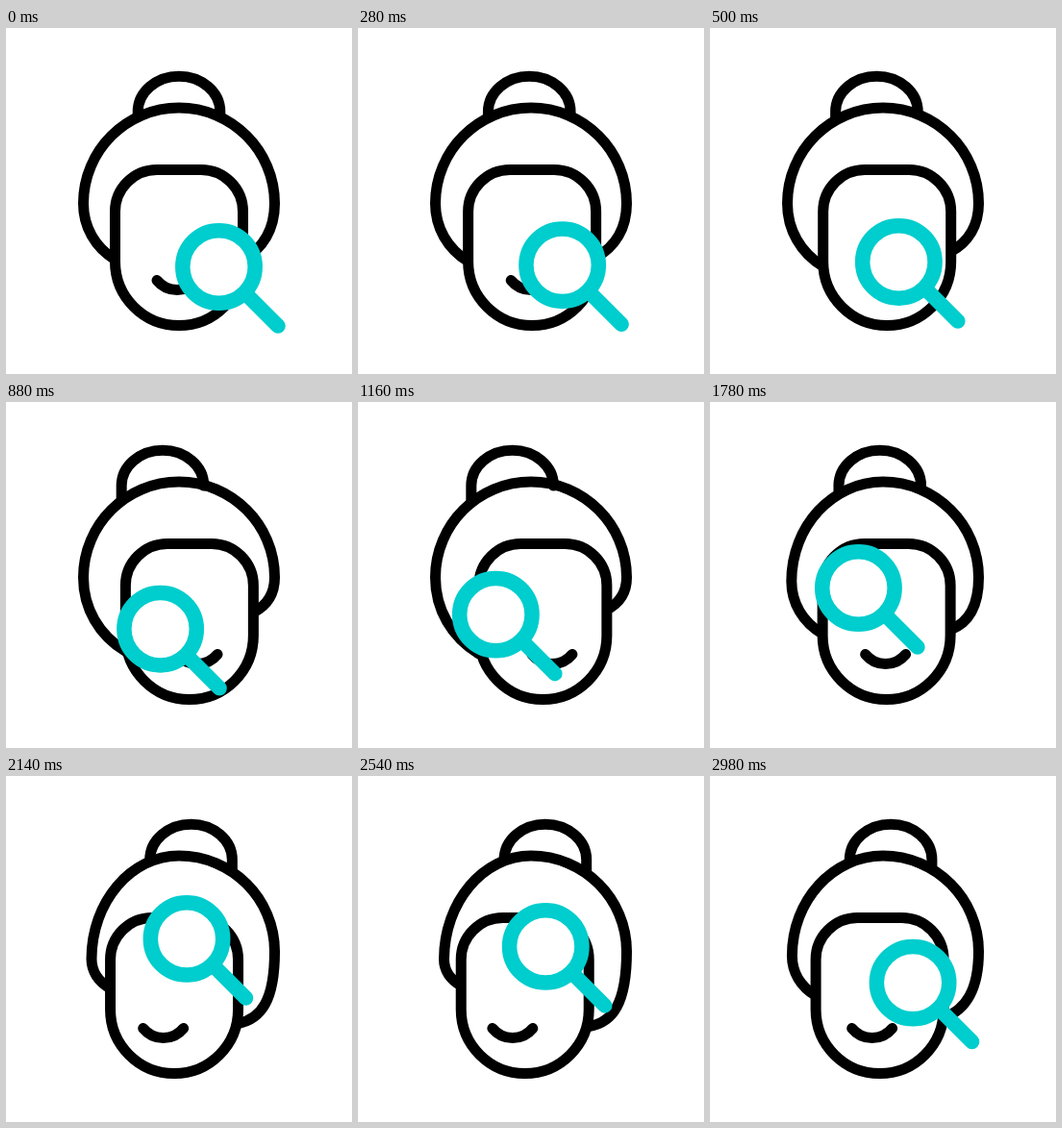
An HTML page that plays this animation: 360 px wide and 360 px high, repeating every 3 s.

```html
<!DOCTYPE html>
<html lang="en">
<head>
<meta charset="utf-8">
<title>Face search</title>
<style>
  html, body { margin: 0; width: 100%; height: 100%; overflow: hidden; background: #fff; }
  svg { display: block; width: 100%; height: 100%; }
  .line { fill: none; stroke: #000; stroke-width: 11; stroke-linecap: round; stroke-linejoin: round; }
  .glass { fill: #fff; stroke: #00cdcd; stroke-width: 15.5; stroke-linecap: round; }
</style>
</head>
<body>
<svg viewBox="0 0 360 360">
  <g class="line">
    <path id="bun"/>
    <path id="hair"/>
    <path id="face" fill="#fff" d="M113.5 191A43.5 43.5 0 0 1 157 147.5H203A43.5 43.5 0 0 1 246.5 191V243A66.5 66.5 0 0 1 113.5 243Z"/>
    <path id="smile" d="M-21 262.5A27 27 0 0 0 21 262.5"/>
  </g>
  <g id="glass" class="glass">
    <path d="M28 28L61.5 61.5"/>
    <circle r="37.7"/>
  </g>
</svg>
<script>
const LOOP = 3000;
const $ = id => document.getElementById(id);
const mix = (a, b, k) => a + (b - a) * k;
const smooth = u => u * u * (3 - 2 * u);

// cubic-bezier(.5, 0, .5, 1)
function ease(p) {
  let lo = 0, hi = 1;
  for (let i = 0; i < 24; i++) {
    const u = (lo + hi) / 2;
    if (1.5 * u - 1.5 * u * u + u * u * u < p) lo = u; else hi = u;
  }
  return smooth(lo);
}

// Head poses: facing front, then each side.
// sideX, sideY: leftmost hair point; left, right: heights of the hair ends; full: roundness at lower right
const front = { bun: 180, face: 0, smile: 178, sideX: 80.5, sideY: 182.5, left: 241, right: 241, full: 0 };
const poseA = { bun: 160.6, face: 12.4, smile: 202, sideX: 80.5, sideY: 182.5, left: 262, right: 216, full: 0 };
const poseB = { bun: 195.2, face: -6.4, smile: 160.5, sideX: 89.7, sideY: 191, left: 217.5, right: 261, full: 1 };
const poses = [front, poseA, poseB, front];
const TURN = 1200;

function headAt(t) {
  const i = Math.floor(t / TURN);
  const k = ease(t / TURN - i);
  const pose = {};
  for (const key in front) pose[key] = mix(poses[i][key], poses[i + 1][key], k);
  return pose;
}

const hairTop = x => 182.5 - Math.sqrt(99.5 ** 2 - (x - 180) ** 2);

function drawHead(p) {
  const bl = p.bun - 42.8, br = p.bun + 42.8;
  $("bun").setAttribute("d",
    `M${bl} ${hairTop(bl) - 2}V87A42.8 36.8 0 0 1 ${br} 87V${Math.max(87, hairTop(br) - 2)}`);

  const y = 182.5, top = 83, mid = 180, far = 279.5, k = 0.552;
  const { sideX, sideY, left, right, full } = p;
  const lx = 113.5 + p.face, rx = 246.5 + p.face;
  $("hair").setAttribute("d",
    `M${lx} ${left}` +
    `C${mix(sideX, lx, .37)} ${mix(sideY, left, .78)} ${sideX} ${mix(sideY, left, .42)} ${sideX} ${sideY}` +
    `C${sideX} ${mix(sideY, top, k)} ${mix(mid, sideX, k)} ${top} ${mid} ${top}` +
    `C${mix(mid, far, k)} ${top} ${far} ${mix(y, top, k)} ${far} ${y}` +
    `C${far} ${mix(y, right, .46 + .24 * full)} ${mix(far, rx, .37)} ${mix(y, right, .8 + .15 * full)} ${rx} ${right}`);

  $("face").setAttribute("transform", `translate(${p.face})`);
  $("smile").setAttribute("transform", `translate(${p.smile})`);
}

const track = (start, end, d) => {
  const path = document.createElementNS("http://www.w3.org/2000/svg", "path");
  path.setAttribute("d", d);
  return { start, end, path, length: path.getTotalLength() };
};
const tracks = [
  track(0, 1500, "M221.5 248.5L163 236.8C148 233.8 141 222 141 208.5"),
  track(1500, 2250, "M141 208.5C141 199 165 188.5 191 167"),
  track(2250, 3540, "M191 167C196 181 213 213 221.5 248.5")
];

function drawGlass(t) {
  const s = tracks.find(s => t < s.end);
  const k = smooth((t - s.start) / (s.end - s.start));
  const { x, y } = s.path.getPointAtLength(k * s.length);
  $("glass").setAttribute("transform", `translate(${x} ${y})`);
}

let origin;
function frame(now) {
  origin ??= now;
  const t = Math.max(0, now - origin) % LOOP;
  drawHead(headAt(t));
  drawGlass(t);
  requestAnimationFrame(frame);
}
drawHead(front);
drawGlass(0);
requestAnimationFrame(frame);
</script>
</body>
</html>
```
